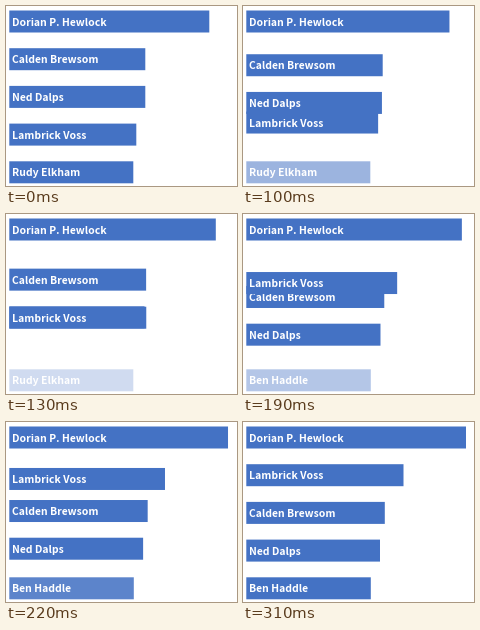
These frames come from a looping animation (231 px wide and 180 px high, 1.38 s). A matplotlib script:

```python
import matplotlib.pyplot as plt
import numpy as np
from matplotlib.animation import FuncAnimation
from matplotlib.patches import Rectangle

W, H, DPI = 231, 180, 100
LOOP_MS, STEP_MS = 1380, 10
BLUE = "#4472C4"
LEFT, BAR_H, TOP, PITCH = 3.3, 22, 15.5, 37.7

# The ranking change is shown in uneven steps: start times and state at each.
TIMES = [0, 60, 100, 130, 150, 190, 220, 280, 310]
PROGRESS = [0, .07, .16, .33, .51, .79, .95, .985, 1]
FADE_OUT = [1, .8, .53, .25, .01, 0, 0, 0, 0]
FADE_IN = [0, 0, 0, 0, 0, .4, .87, .95, 1]
STEADY = [1] * len(TIMES)

# name, start rank, end rank, start right edge, end right edge, opacity
BARS = [
    ("Dorian P. Hewlock", 0, 0, 203.3, 223, STEADY),
    ("Calden Brewsom", 1, 2, 139.3, 141.8, STEADY),
    ("Ned Dalps", 2, 3, 139.3, 137, STEADY),
    ("Lambrick Voss", 3, 1, 130.3, 160.5, STEADY),
    ("Rudy Elkham", 4, 4, 127.3, 127.3, FADE_OUT),
    ("Ben Haddle", 4, 4, 127.8, 127.8, FADE_IN),
]

fig = plt.figure(figsize=(W / DPI, H / DPI), dpi=DPI, facecolor="white")
ax = fig.add_axes([0, 0, 1, 1])
ax.set_xlim(0, W)
ax.set_ylim(H, 0)
ax.axis("off")


def make_bar(name, z):
    box = Rectangle((LEFT, 0), 1, BAR_H, fc=BLUE, lw=0, snap=False, zorder=z)
    ax.add_patch(box)
    label = ax.text(6, 0, name, color="white", family="Noto Sans CJK JP",
                    weight="bold", size=10.4 * 72 / DPI, va="baseline",
                    zorder=z + .5)
    return box, label


artists = [make_bar(bar[0], z) for z, bar in enumerate(BARS, 1)]


def draw(frame):
    step = np.searchsorted(TIMES, frame * STEP_MS, side="right") - 1
    p = PROGRESS[step]
    for (box, label), (_, rank0, rank1, end0, end1, fade) in zip(artists, BARS):
        y = TOP + PITCH * (rank0 + (rank1 - rank0) * p)
        box.set_y(y - BAR_H / 2)
        box.set_width(end0 + (end1 - end0) * p - LEFT)
        box.set_alpha(fade[step])  # only the bar fades; its label stays white
        label.set_y(y + 4)
        label.set_visible(fade[step] > 0)
    return [artist for pair in artists for artist in pair]


anim = FuncAnimation(fig, draw, frames=LOOP_MS // STEP_MS, interval=STEP_MS,
                     repeat=True, repeat_delay=0)
plt.show()
```
